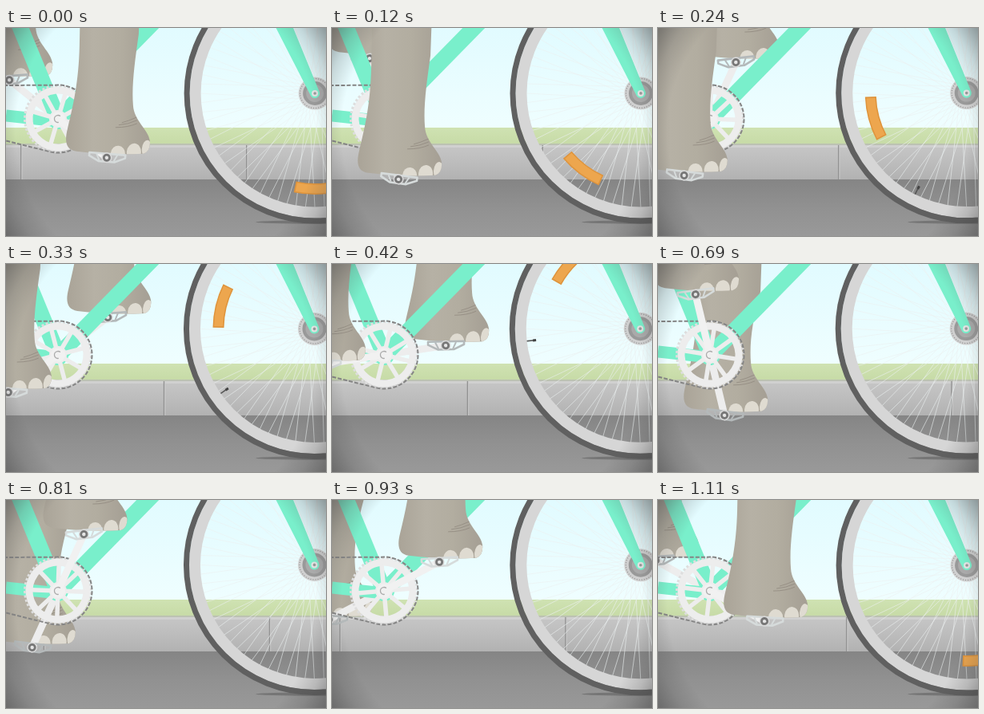
Recreate the animation shown at these times as an HTML page with a canvas. Size 400 by 261 pixels, loop 1.14 s.

```html
<!DOCTYPE html>
<html>
<head>
<meta charset="utf-8">
<style>
html, body { margin: 0; height: 100%; overflow: hidden; }
canvas { display: block; }
</style>
</head>
<body>
<canvas width="400" height="261"></canvas>
<script>
const c = document.querySelector('canvas').getContext('2d');
const TAU = Math.PI * 2, STEPS = 38, STEP_MS = 30;
const rad = d => d * Math.PI / 180;
const MINT = '#79efcb', CRANK = [65, 114], HUB = [385.6, 81.5];

function gradient(x0, y0, x1, y1, ...colors) {
  const g = c.createLinearGradient(x0, y0, x1, y1);
  colors.forEach((color, i) => g.addColorStop(i / (colors.length - 1), color));
  return g;
}
function rect(x, y, w, h, fill) {
  c.fillStyle = fill;
  c.fillRect(x, y, w, h);
}
function line(x0, y0, x1, y1, color, width, cap = 'butt') {
  c.beginPath();
  c.moveTo(x0, y0);
  c.lineTo(x1, y1);
  c.strokeStyle = color;
  c.lineWidth = width;
  c.lineCap = cap;
  c.stroke();
}
function disc(x, y, r, fill) {
  c.beginPath();
  c.arc(x, y, r, 0, TAU);
  c.fillStyle = fill;
  c.fill();
}
function arc(x, y, r, color, width, from = 0, to = TAU) {
  c.beginPath();
  c.arc(x, y, r, from, to);
  c.strokeStyle = color;
  c.lineWidth = width;
  c.lineCap = 'butt';
  c.stroke();
}
function at(x, y, angle, draw) {
  c.save();
  c.translate(x, y);
  c.rotate(angle);
  draw();
  c.restore();
}

function background(n) {
  rect(0, 0, 400, 125, gradient(0, 0, 0, 125, '#e1fbff', '#effeff'));
  rect(0, 125, 400, 20, gradient(0, 125, 0, 145, '#cfe2b2', '#c7dba7'));
  rect(0, 145, 400, 2, '#bcc2b2');
  rect(0, 147, 400, 3, '#d0d0d0');
  rect(0, 150, 400, 40, gradient(0, 150, 0, 190, '#c5c5c5', '#b2b2b2'));
  for (let x = 19 - 9.38 * n; x < 400; x += 282) {
    rect(x - 1, 147, 1.5, 43, '#929292');
    rect(x + .5, 147, 1, 43, '#cacaca');
  }
  rect(0, 190, 400, 71, gradient(0, 190, 0, 261, '#858585', '#919191', '#999'));
}

function leg(x, y, calf) {
  c.save();
  c.translate(x, y);
  c.beginPath();
  c.moveTo(-32, -240);
  c.lineTo(-34, -140);
  c.bezierCurveTo(-35, -95, -42, -65, -49, -36);
  c.bezierCurveTo(-53, -20, -51, -10, -38, -8);
  c.quadraticCurveTo(0, -3, 46, -5);
  c.quadraticCurveTo(55, -8, 54, -21);
  c.bezierCurveTo(52, -36, 34, -46, 33, -66);
  c.bezierCurveTo(31, -90, 35, -120, calf, -155);
  c.lineTo(calf + 3, -240);
  c.closePath();
  c.fillStyle = gradient(-50, 0, 50, 0, '#aaa498', '#b6b1a5', '#b2ada0', '#a6a095');
  c.fill();
  c.clip();
  for (const [nx, ny, rx, ry] of [[14, -5, 9, 10], [34, -7, 9, 11], [50, -11, 6, 11]]) {
    c.beginPath();
    c.ellipse(nx, ny, rx, ry, .1, 0, TAU);
    c.fillStyle = '#dfdbd1';
    c.fill();
  }
  for (let i = 0; i < 3; i++) {
    c.beginPath();
    c.moveTo(11 + i * 4, -38 - i * 3);
    c.quadraticCurveTo(27, -38 - i * 4, 38, -43 - i * 4);
    c.strokeStyle = '#918a7f';
    c.lineWidth = .8;
    c.stroke();
  }
  c.restore();
}

function pedal(x, y, tilt, color) {
  at(x, y, tilt, () => {
    c.beginPath();
    c.moveTo(-22, -5);
    c.lineTo(23, -5);
    c.lineTo(23, -1);
    c.lineTo(10, 5);
    c.lineTo(-10, 5);
    c.lineTo(-22, -1);
    c.closePath();
    c.strokeStyle = color;
    c.lineWidth = 2.6;
    c.lineJoin = 'round';
    c.stroke();
    line(-13, -4, -9, 4, color, 2);
    line(13, -4, 9, 4, color, 2);
    disc(0, 0, 6.5, '#dadada');
    disc(0, 0, 5, '#777');
    disc(0, 0, 2.2, '#e5e5e5');
  });
}

const armEnd = a => [CRANK[0] + 78 * Math.cos(a), CRANK[1] + 78 * Math.sin(a)];
const tilt = a => .13 * Math.sin(a);

function farSide(a) {
  const [x, y] = armEnd(a);
  leg(x, y, 45);
  line(...CRANK, x, y, '#ededed', 9, 'round');
  pedal(x, y, tilt(a), '#b4b9ba');
}

function nearSide(a) {
  const [x, y] = armEnd(a);
  line(...CRANK, x, y, '#f1f1f1', 9, 'round');
  disc(...CRANK, 9, '#f1f1f1');
  arc(...CRANK, 4.5, '#aaa', 1.3, rad(80), rad(310));
  leg(x, y, 40);
  pedal(x, y, tilt(a), '#d6dbdb');
}

function bikeFrame() {
  line(0, 110, 65, 117, MINT, 15);
  line(14, -10, 65, 114, MINT, 20);
  line(60, 120, 187, -10, MINT, 20);
  disc(...CRANK, 13, MINT);
}

function chainring(a, n) {
  at(...CRANK, a, () => {
    arc(0, 0, 36, '#ededed', 9);
    c.setLineDash([3, 2.45]);
    arc(0, 0, 41.5, '#dedede', 3);
    c.setLineDash([]);
    for (let i = 0; i < 8; i++) {
      const s = (i + .5) * TAU / 8;
      line(0, 0, 34 * Math.cos(s), 34 * Math.sin(s), '#ededed', 5.5);
    }
    disc(0, 0, 11, '#ededed');
  });
  c.beginPath();
  c.moveTo(-10, 72);
  c.arc(...CRANK, 42.5, rad(-96), rad(107));
  c.lineTo(-10, 139);
  c.setLineDash([5, 2.1]);
  c.lineDashOffset = -7.1 * n;
  c.strokeStyle = '#858585';
  c.lineWidth = 2;
  c.stroke();
  c.setLineDash([]);
  c.lineDashOffset = 0;
}

function wheel(turn) {
  c.beginPath();
  c.ellipse(386, 243.5, 74, 2.2, 0, 0, TAU);
  c.fillStyle = 'rgba(105,105,105,.7)';
  c.fill();
  const bob = .5 * Math.cos(turn), hub = [HUB[0] + bob, HUB[1] + bob];
  at(...hub, turn, () => {
    for (let i = 0; i < 76; i++) {
      const s = i * TAU / 76, b = s + (i % 2 ? .4 : -.4);
      line(18 * Math.cos(b), 18 * Math.sin(b), 144 * Math.cos(s), 144 * Math.sin(s),
        'rgba(236,240,240,.7)', .8);
    }
    arc(0, 0, 120, '#df943c', 14, rad(76.5), rad(102));
    arc(0, 0, 120, '#eda64e', 11, rad(77.3), rad(101.2));
    at(0, 0, rad(41.1), () => {
      line(131, 0, 144, 0, '#555', 1.6);
      line(131, 0, 135, 0, '#444', 3);
    });
  });
  arc(...hub, 149.5, '#d6d6d6', 14);
  arc(...hub, 160, '#606060', 7);

  disc(...hub, 20.5, '#d0d0d0');
  at(...hub, turn, () => {
    for (let i = 0; i < 38; i++) {
      const s = i * TAU / 38;
      disc(18.5 * Math.cos(s), 18.5 * Math.sin(s), .7, '#999');
    }
  });
  disc(...hub, 15, '#999');
  disc(...hub, 11, '#aaa');
  c.beginPath();
  c.moveTo(335, -5);
  c.lineTo(357, -5);
  c.arc(...hub, 6, rad(-25), rad(155));
  c.closePath();
  c.fillStyle = MINT;
  c.fill();
  disc(...hub, 4, '#e4e4e4');
  disc(...hub, 1.8, '#999');
}

const shade = c.createRadialGradient(200, 130, 188, 200, 130, 242);
shade.addColorStop(0, 'rgba(70,70,70,0)');
shade.addColorStop(.45, 'rgba(70,70,70,.2)');
shade.addColorStop(1, 'rgba(70,70,70,.6)');

function draw(time) {
  const n = Math.floor(time / STEP_MS) % STEPS;
  const turn = n * TAU / STEPS, crank = turn + rad(38.7);
  background(n);
  farSide(crank + Math.PI);
  bikeFrame();
  chainring(crank, n);
  nearSide(crank);
  wheel(turn);
  rect(0, 0, 400, 261, shade);
}

let start;
function tick(now) {
  start ??= now;
  draw(now - start);
  requestAnimationFrame(tick);
}
draw(0);
requestAnimationFrame(tick);
</script>
</body>
</html>
```
